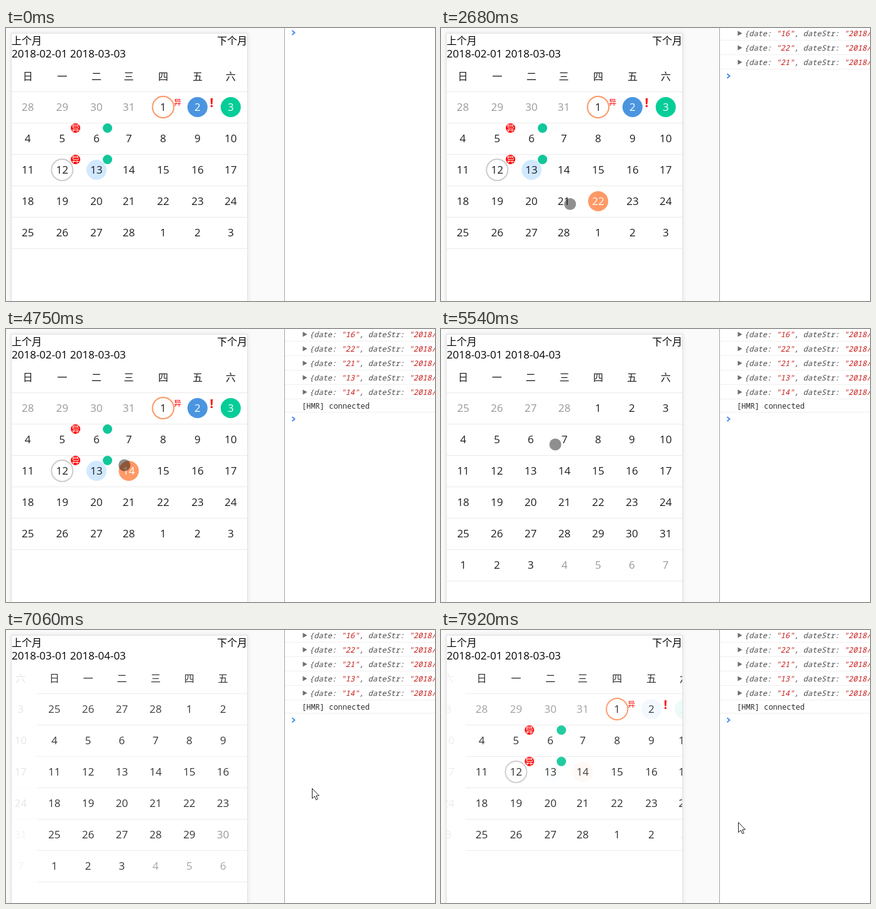
Recreate the animation shown at these times as an HTML page. Size 683 by 435 pixels, loop 8 s.

```html
<!DOCTYPE html>
<html lang="zh-CN">
<head>
<meta charset="utf-8">
<title>Calendar</title>
<style>
html, body { margin: 0; width: 100%; height: 100%; overflow: hidden; background: #fff; }
svg { display: block; width: 683px; height: 435px; }
text { font: 16px 'Noto Sans CJK SC', 'Noto Sans CJK', sans-serif; white-space: pre; }
.num { font: 17px 'Open Sans', 'Noto Sans', sans-serif; }
.mid text { text-anchor: middle; }
.mid .bang { font: bold 20px 'Noto Sans', sans-serif; fill: #f00; }
.mid .odd { font-size: 12px; fill: #f00; }
.mid .badge { font-size: 13px; font-weight: 500; fill: #fff; }
#logs text { font: 12px 'Noto Sans Mono', 'DejaVu Sans Mono', monospace; fill: #303030; }
#logs .obj { font-style: italic; fill: #4c4c4c; }
#logs .obj tspan { fill: #c41a16; }
#phone { filter: drop-shadow(0 0 3px rgba(0, 0, 0, .1)); }
.line { stroke: #ebebeb; }
</style>
</head>
<body>
<svg viewBox="0 0 683 435">
  <clipPath id="view"><rect x="9" y="52" width="375" height="383"/></clipPath>
  <rect width="443" height="435" fill="#fafafa"/>
  <rect id="phone" x="8.5" y="8.5" width="376" height="460" fill="#fff" stroke="#e2e2e2"/>
  <text x="9" y="26">上个月</text>
  <text x="384" y="26" text-anchor="end">下个月</text>
  <text id="range" class="num" x="9" y="47"></text>
  <g clip-path="url(#view)">
    <g class="panel mid"></g>
    <g class="panel mid"></g>
  </g>
  <rect x="443" width="240" height="435" fill="#fff"/>
  <path d="M443.5 0V435" stroke="#a3a3a3"/>
  <g id="logs"></g>
  <path id="prompt" d="M455.5 -3.5L459.5 0L455.5 3.5" fill="none" stroke="#4a8cf0" stroke-width="2"/>
  <circle id="touch" r="9.5" fill="#000" fill-opacity=".44"/>
  <path id="arrow" d="M.5 .5V16.5L4.3 13L6.8 18.7L9.2 17.6L6.8 12H11.5Z" fill="#fff" stroke="#222"/>
</svg>
<script>
const LOOP = 8000, FADE = 500, LEFT = 9, WIDTH = 376, ROW = 50, FEB = 2, EXTRA_DAYS = 3;
const FIRST_LOG = 1360, LOG_GAP = 642, SELECT_LAG = 103, LOG_ROW = 23;
const $ = id => document.getElementById(id);
const range = n => [...Array(n).keys()];
const lerp = (a, b, p) => a + (b - a) * p;
const rowY = r => 126 + r * ROW;

// Ringed days widen their columns in February; the last column takes what is left.
function columns(month) {
  if (month !== FEB) return range(7).map(c => LEFT + WIDTH / 7 * (c + .5) - .5);
  const edges = range(7).map(c => LEFT + 51.4 * c + 6.6 * ((c > 1) + (c > 4)));
  return edges.map((x, c) => (x + (edges[c + 1] ?? LEFT + WIDTH)) / 2);
}

function makeMonth(n) {
  const lead = new Date(2018, n - 1, 1).getDay();
  const days = new Date(2018, n, 0).getDate();
  return {
    lead, days,
    before: new Date(2018, n - 1, 0).getDate(),
    rows: Math.ceil((lead + days + EXTRA_DAYS) / 7),
    cols: columns(n),
    label: `2018-0${n}-01 2018-0${n + 1}-0${EXTRA_DAYS}`
  };
}
const months = Object.fromEntries([FEB, 3, 4].map(n => [n, makeMonth(n)]));

// dir: 1 slides to the next month, -1 to the previous one, 0 stays
const clicks = [16, 22, 21, 13, 14];
const swipes = [[5030, 1], [6120, 1], [7006, -1], [7876, -1]];
const states = [{ t: -FADE, month: FEB, dir: 0 }];
clicks.forEach((sel, i) =>
  states.push({ t: FIRST_LOG + i * LOG_GAP + SELECT_LAG, month: FEB, sel, dir: 0 }));
for (const [t, dir] of swipes) {
  const month = states.at(-1).month + dir;
  states.push({ t, month, dir, sel: month === FEB ? clicks.at(-1) : undefined });
}

// pointer stops: time, x, y
const route = [
  [360, 609, 409], [1230, 304.5, 234], [2000, 250, 277], [2680, 205.5, 280.5],
  [3200, 125, 231], [3930, 192, 229], [4270, 185, 337], [4750, 188.5, 217],
  [5030, 72, 188], [5540, 182, 184], [6120, 80, 186], [6760, 152, 210],
  [7060, 487, 252], [7520, 125, 266], [7840, 533, 300], [7920, 473, 306]
];

const INK = [30, 30, 30], GRAY = [153, 153, 153], WHITE = [255, 255, 255];
const ORANGE = [255, 153, 102];
const febFill = { 2: [75, 149, 224], 3: [5, 205, 152], 13: [209, 233, 255] };
const mix = (a, b, p) => `rgb(${a.map((v, i) => Math.round(lerp(v, b[i], p)))})`;

// cubic-bezier(.25, .1, .25, 1)
function ease(x) {
  if (x <= 0) return 0;
  if (x >= 1) return 1;
  const curve = (a, b, s) => 3 * a * s * (1 - s) ** 2 + 3 * b * s * s * (1 - s) + s ** 3;
  let lo = 0, hi = 1;
  for (let i = 0; i < 24; i++) {
    const s = (lo + hi) / 2;
    if (curve(.25, .25, s) < x) lo = s; else hi = s;
  }
  return curve(.1, 1, lo);
}

function cellLook(state, i) {
  const m = months[state.month];
  if (i >= m.rows * 7) return null;
  const n = i - m.lead + 1, after = n - m.days;
  if (n < 1) return { day: m.before + n, ink: GRAY };
  if (after > 0) return { day: after, ink: after > EXTRA_DAYS ? GRAY : INK };
  if (n === state.sel) return { day: n, ink: WHITE, fill: ORANGE };
  const fill = state.month === FEB ? febFill[n] : undefined;
  return { day: n, ink: fill && n < 4 ? WHITE : INK, fill };
}

// February's marks sit relative to the centre of their day
function spot(day) {
  const { lead, cols } = months[FEB], i = day + lead - 1;
  return `<g transform="translate(${cols[i % 7]} ${rowY(Math.floor(i / 7))})">`;
}
const ring = (day, color) =>
  `${spot(day)}<circle r="17" fill="none" stroke="${color}" stroke-width="2"/></g>`;
const dot = (x, color) => `<circle cx="${x}" cy="-16.5" r="7.5" fill="${color}"/>`;
const badge = day =>
  `${spot(day)}${dot(21.3, '#f00')}<text class="badge" x="21.3" y="-11.7">异</text></g>`;
const marks = ring(1, '#fb9865') + ring(12, '#ccc') + badge(5) + badge(12) +
  [6, 13].map(day => `${spot(day)}${dot(17.5, '#11c79a')}</g>`).join('') +
  `${spot(1)}<text class="odd" x="23" y="-3.5">异</text></g>` +
  `${spot(2)}<text class="bang" x="22.5">!</text></g>`;

const panels = [...document.querySelectorAll('.panel')].map(root => {
  const rows = range(7).map(r => `<path class="line" d="M9 ${101.5 + r * ROW}H385"/>`);
  const heads = [...'日一二三四五六'].map(d => `<text class="head" y="83" fill="#1e1e1e">${d}</text>`);
  const cells = range(42).map(i => {
    const y = rowY(Math.floor(i / 7));
    return `<g class="cell"><circle cy="${y}" r="16"/><text class="num" y="${y + 6}"></text></g>`;
  });
  root.innerHTML = [...rows, ...heads, ...cells, `<g class="marks">${marks}</g>`].join('');
  return {
    root,
    lines: [...root.querySelectorAll('.line')],
    heads: [...root.querySelectorAll('.head')],
    cells: [...root.querySelectorAll('.cell')],
    marks: root.querySelector('.marks')
  };
});

const objectLog = (day, i) => {
  const y = 13 + i * LOG_ROW;
  return `<g><path d="M472.5 ${y - 8.5}l7 4l-7 4Z" fill="#6e6e6e"/>
    <text class="obj" x="483" y="${y}">{date: <tspan>"${day}"</tspan>, dateStr: <tspan>"2018/02/${day}"</tspan></text>
    <path d="M444 ${y + 6.5}H683" stroke="#f0f0f0"/></g>`;
};
$('logs').innerHTML = clicks.map(objectLog).join('') +
  '<g><text x="471" y="127">[HMR] connected</text><path d="M444 132.5H683" stroke="#f0f0f0"/></g>';
const logRows = [...$('logs').children];

const show = (el, on) => el.style.display = on ? '' : 'none';

function paint(panel, prev, cur, p) {
  const m = months[cur.month];
  panel.heads.forEach((h, c) => h.setAttribute('x', m.cols[c]));
  panel.lines.forEach((l, r) => show(l, r <= m.rows));
  show(panel.marks, cur.month === FEB);
  panel.cells.forEach((cell, i) => {
    const to = cellLook(cur, i);
    show(cell, to);
    if (!to) return;
    const from = cellLook(prev, i) || to;
    const [disc, label] = cell.children;
    const x = m.cols[i % 7];
    disc.setAttribute('cx', x);
    label.setAttribute('x', x);
    label.textContent = to.day;
    label.setAttribute('fill', mix(from.ink, to.ink, p));
    const a = from.fill || to.fill, b = to.fill || from.fill;
    show(disc, a);
    if (!a) return;
    disc.setAttribute('fill', mix(a, b, p));
    disc.setAttribute('fill-opacity', lerp(from.fill ? 1 : 0, to.fill ? 1 : 0, p));
  });
}

function place(panel, x, opacity) {
  panel.root.setAttribute('transform', `translate(${x.toFixed(2)} 0)`);
  panel.root.setAttribute('opacity', opacity);
}

function drawCalendar(t) {
  const k = states.findLastIndex(s => s.t <= t);
  const cur = states[k], prev = states[Math.max(0, k - 1)];
  const p = ease((t - cur.t) / FADE);
  const sliding = cur.dir !== 0 && p < 1;
  const [main, leaving] = panels;
  $('range').textContent = months[cur.month].label;
  paint(main, prev, cur, p);
  place(main, sliding ? cur.dir * WIDTH * (1 - p) : 0, sliding ? p : 1);
  show(leaving.root, sliding);
  if (sliding) {
    paint(leaving, prev, cur, p);
    place(leaving, -cur.dir * WIDTH * p, 1 - p);
  }
}

function drawConsole(t) {
  const passed = Math.floor((t - FIRST_LOG) / LOG_GAP) + 1;
  const n = Math.min(Math.max(passed, 0), logRows.length);
  logRows.forEach((row, i) => show(row, i < n));
  const y = Math.min(7.5 + n * LOG_ROW, 143.5);
  $('prompt').setAttribute('transform', `translate(0 ${y})`);
}

function drawPointer(t) {
  const k = route.findLastIndex(([at]) => at <= t);
  const [t0, x0, y0] = route[Math.max(k, 0)];
  const [t1, x1, y1] = route[k + 1] || [LOOP, x0, y0];
  const s = (t - t0) / (t1 - t0), p = s * s * (3 - 2 * s);
  const x = lerp(x0, x1, p), y = lerp(y0, y1, p);
  for (const id of ['touch', 'arrow']) {
    show($(id), k >= 0 && (id === 'touch') === (x < 385));
    $(id).setAttribute('transform', `translate(${x.toFixed(1)} ${y.toFixed(1)})`);
  }
}

const start = performance.now();
function frame() {
  const t = (performance.now() - start) % LOOP;
  drawCalendar(t);
  drawConsole(t);
  drawPointer(t);
  requestAnimationFrame(frame);
}
frame();
</script>
</body>
</html>
```
